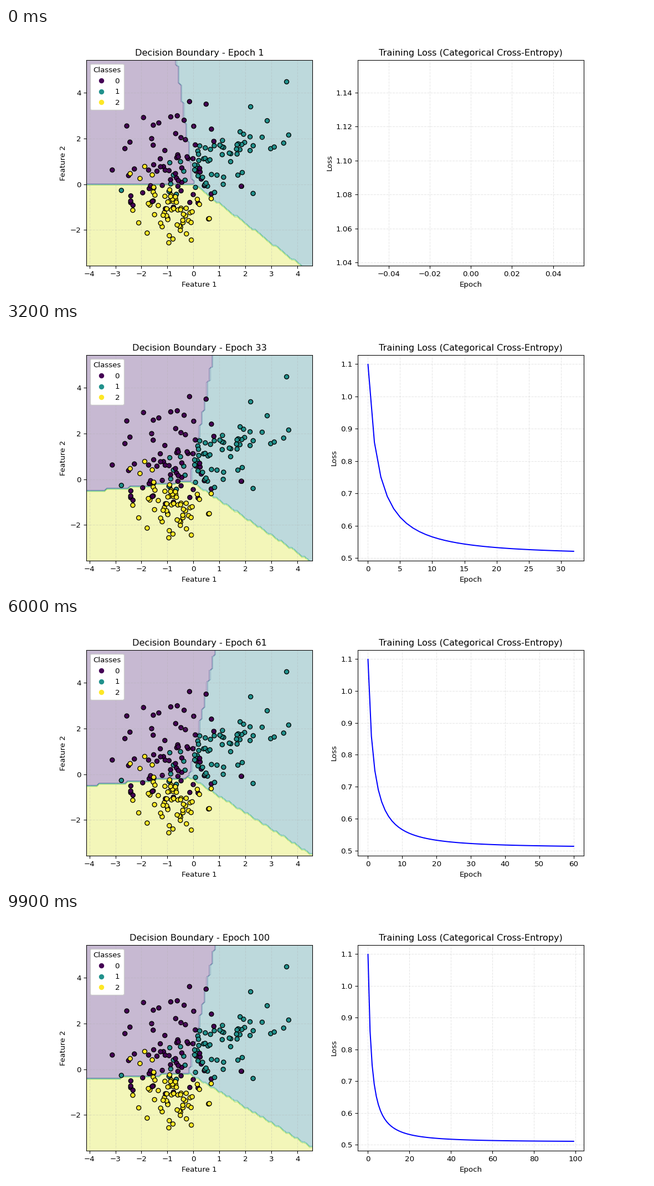
These frames come from a looping animation (1159 by 483 pixels, 10000 ms). A matplotlib script:

```python
import numpy as np
import matplotlib.pyplot as plt
from matplotlib.animation import FuncAnimation

EPOCHS = 100
SAMPLES = 200
CLASSES = 3
RATE = 0.5
STEP = 0.1


def make_samples(seed):
    """Three sheared Gaussian clusters around corners of a square."""
    rng = np.random.RandomState(seed)
    corners = rng.permutation(4)[:CLASSES]
    centers = 2.0 * np.column_stack([corners // 2, corners % 2]) - 1
    x = rng.standard_normal((SAMPLES, 2))
    y = np.sort(np.arange(SAMPLES) % CLASSES)
    for k, center in enumerate(centers):
        shear = 2 * rng.uniform(size=(2, 2)) - 1
        x[y == k] = x[y == k] @ shear + center
    # A few labels are noise
    flip = rng.uniform(size=SAMPLES) < 0.01
    y[flip] = rng.randint(CLASSES, size=flip.sum())
    order = np.arange(SAMPLES)
    rng.shuffle(order)
    columns = np.arange(2)
    rng.shuffle(columns)
    return x[order][:, columns], y[order]


def softmax(scores):
    e = np.exp(scores - scores.max(axis=1, keepdims=True))
    return e / e.sum(axis=1, keepdims=True)


def train(x, y):
    """Softmax regression; the loss before and the model after each step."""
    truth = np.eye(CLASSES)[y]
    weights, bias = np.zeros((2, CLASSES)), np.zeros(CLASSES)
    losses, models = [], []
    for _ in range(EPOCHS):
        p = softmax(x @ weights + bias)
        losses.append(-np.log(p[np.arange(len(y)), y]).mean())
        error = (p - truth) / len(y)
        weights = weights - RATE * x.T @ error
        bias = bias - RATE * error.sum(axis=0)
        models.append((weights, bias))
    return losses, models


x, y = make_samples(42)
losses, models = train(x, y)

low, high = x.min(axis=0) - 1, x.max(axis=0) + 1
xs = np.arange(low[0], high[0], STEP)
ys = np.arange(low[1], high[1], STEP)
grid_x, grid_y = np.meshgrid(xs, ys)
nodes = np.column_stack([grid_x.ravel(), grid_y.ravel()])

fig, (ax_map, ax_loss) = plt.subplots(1, 2, figsize=(12, 5), dpi=96.6)

points = ax_map.scatter(x[:, 0], x[:, 1], c=y, cmap="viridis",
                        edgecolors="k", zorder=1.2)
ax_map.legend(*points.legend_elements(), title="Classes", loc="upper left",
              framealpha=1)
ax_map.set(xlim=(xs[0], xs[-1]), ylim=(ys[0], ys[-1]),
           xlabel="Feature 1", ylabel="Feature 2")
title = ax_map.set_title("Decision Boundary - Epoch 1")

curve, = ax_loss.plot([], [], "b-")
ax_loss.set(title="Training Loss (Categorical Cross-Entropy)",
            xlabel="Epoch", ylabel="Loss")
for ax in (ax_map, ax_loss):
    ax.grid(True, linestyle="--", alpha=0.3)

regions = []


def update(i):
    while regions:
        regions.pop().remove()
    weights, bias = models[i]
    winner = np.argmax(nodes @ weights + bias, axis=1).reshape(grid_x.shape)
    regions.append(ax_map.contourf(grid_x, grid_y, winner,
                                   alpha=0.3, cmap="viridis"))
    title.set_text(f"Decision Boundary - Epoch {i + 1}")
    curve.set_data(np.arange(i + 1), losses[:i + 1])
    ax_loss.relim()
    ax_loss.autoscale_view()


anim = FuncAnimation(fig, update, frames=EPOCHS, interval=100,
                     repeat=True, repeat_delay=0)
plt.show()
```
